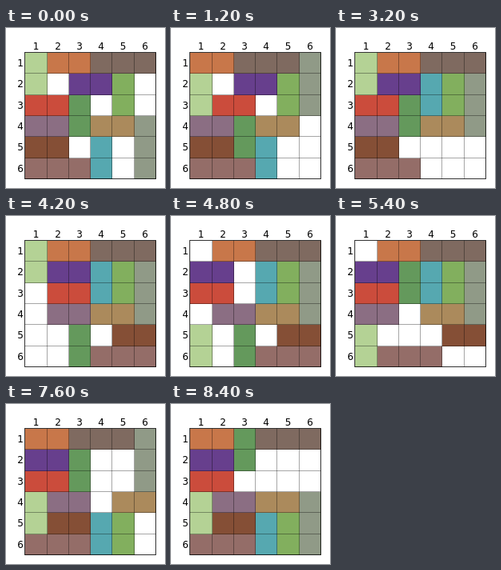
Animation, 199 px wide and 200 px high, one loop 8600 ms. Source, as an HTML page:

```html
<!DOCTYPE html>
<html lang="en">
<head>
<meta charset="utf-8">
<title>Sliding block puzzle</title>
<style>
  html, body { margin: 0; width: 100%; height: 100%; overflow: hidden; background: #fff; }
  svg { display: block; width: 100vw; height: 100vh; }
  text { font: 12px "DejaVu Sans", sans-serif; fill: #000; }
</style>
</head>
<body>
<svg id="stage" viewBox="0 0 199 200"></svg>
<script>
const SIZE = 6, STEP = 200;
const stage = document.getElementById('stage');
// Grid lines sit on whole pixels.
const lineX = i => Math.floor(23.9 + i * 27.25) + 0.5;
const lineY = i => Math.floor(30.4 + i * 26.35) + 0.5;

// name: [column, row, length, vertical, colour]
const blocks = {
  A: [0, 0, 2, 1, '#b4d295'],
  O: [1, 0, 2, 0, '#c8774a'],
  B: [3, 0, 3, 0, '#7f6a60'],
  P: [2, 1, 2, 0, '#673f8d'],
  G: [4, 1, 2, 1, '#82af5e'],
  R: [0, 2, 2, 0, '#cb4c3c'],
  D: [2, 2, 2, 1, '#64995c'],
  V: [0, 3, 2, 0, '#8b6e83'],
  T: [3, 3, 2, 0, '#ab8a5c'],
  S: [5, 3, 3, 1, '#909a87'],
  N: [0, 4, 2, 0, '#854f36'],
  C: [3, 4, 2, 1, '#56a8b0'],
  M: [0, 5, 3, 0, '#946d68']
};

// Each move slides one block by a signed number of cells.
const moves = (
  'D1 R1 A1 O-1 B-1 S-3 P-1 T1 C-3 T-1 S1 B1 O1 A-1 R-1 D-1 ' +
  'N4 M3 D2 R1 V1 A4 P-1 R-1 V-1 D-3 M-2 O-1 B-1 T-1 S-1 N-3 G3 ' +
  'T2 V1 A-1 M-1 C3 T-1 S3 B1 D-1'
).split(' ').map(m => [m[0], Number(m.slice(1))]);

function add(tag, attrs, text) {
  const el = document.createElementNS('http://www.w3.org/2000/svg', tag);
  for (const key in attrs) el.setAttribute(key, attrs[key]);
  if (text) el.textContent = text;
  return stage.appendChild(el);
}

const shapes = {};
for (const name in blocks) {
  shapes[name] = add('rect', { fill: blocks[name][4], 'shape-rendering': 'crispEdges' });
}

const left = lineX(0), right = lineX(SIZE), top_ = lineY(0), bottom = lineY(SIZE);
for (let i = 1; i < SIZE; i++) {
  const style = { stroke: '#000', 'stroke-opacity': 0.35 };
  add('path', { d: `M${lineX(i)} ${top_}V${bottom}`, ...style });
  add('path', { d: `M${left} ${lineY(i)}H${right}`, ...style });
}
add('rect', {
  x: left, y: top_, width: right - left, height: bottom - top_,
  fill: 'none', stroke: '#000', 'stroke-opacity': 0.8
});

for (let i = 0; i < SIZE; i++) {
  add('text', { x: (lineX(i) + lineX(i + 1)) / 2, y: 27, 'text-anchor': 'middle' }, i + 1);
  add('text', { x: 22, y: (lineY(i) + lineY(i + 1)) / 2 + 4.4, 'text-anchor': 'end' }, i + 1);
}

function place(name, shift) {
  const [c, r, len, vertical] = blocks[name];
  const col = vertical ? c : c + shift;
  const row = vertical ? r + shift : r;
  const x = lineX(col), y = lineY(row);
  const attrs = {
    x, y,
    width: lineX(col + (vertical ? 1 : len)) - x,
    height: lineY(row + (vertical ? len : 1)) - y
  };
  for (const key in attrs) shapes[name].setAttribute(key, attrs[key]);
}

function draw(count) {
  const shift = {};
  for (const [name, by] of moves.slice(0, count)) shift[name] = (shift[name] || 0) + by;
  for (const name in blocks) place(name, shift[name] || 0);
}

const start = performance.now();
let shown = -1;
function tick() {
  const count = Math.floor((performance.now() - start) / STEP) % (moves.length + 1);
  if (count !== shown) draw(shown = count);
  requestAnimationFrame(tick);
}
tick();
</script>
</body>
</html>
```
